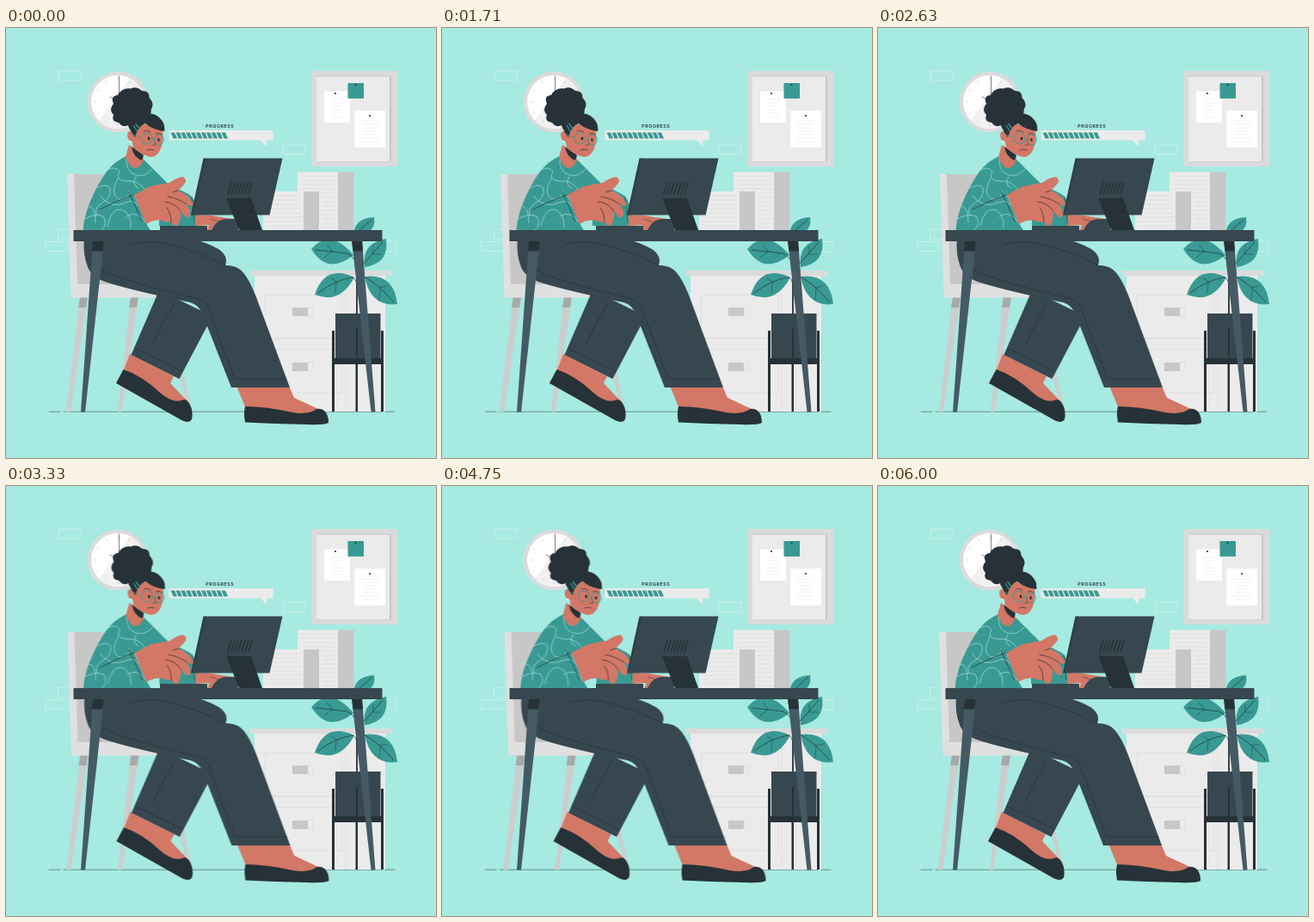
Write an HTML page that moves like this. It is 500 by 500 pixels and loops after 6040 ms.

```html
<!DOCTYPE html>
<html lang="en">
<head>
<meta charset="utf-8">
<title>Work in progress</title>
<style>
html, body { margin: 0; width: 100%; height: 100%; overflow: hidden; background: #a6eae1; }
svg { display: block; width: 100vw; height: 100vh; stroke-width: .7; }
.sway { animation: sway 6040ms linear infinite; }
/* Six seconds of motion, then a 40 ms rest */
@keyframes sway {
  0%, 99.338%, 100% { transform: translateX(0); }
  9.934%, 89.404% { transform: translateX(-1px); }
  19.868%, 79.47% { transform: translateX(2px); }
  29.801%, 49.669%, 69.536% { transform: translateX(-4px); }
  39.735%, 59.603% { transform: translateX(4px); }
}
.teal { fill: #399a93; }
.skin { fill: #d37766; }
.ink { fill: #263238; }
.slate { fill: #37474f; }
.steel { fill: #455a64; }
.pale { fill: #ebebeb; }
.soft { fill: #dbdbdb; }
.grey { fill: #c7c7c7; }
.line { fill: none; stroke: #263238; stroke-linecap: round; stroke-linejoin: round; }
.faint { fill: none; stroke: #dadada; }
.brick { fill: none; stroke: #d9f0ec; }
.swirl { fill: none; stroke: #a9ded8; stroke-linecap: round; }
.frame { fill: none; stroke: #399a93; }
.label { font: 600 5.3px Inter, "Open Sans", sans-serif; fill: #263238; }
</style>
</head>
<body>
<svg viewBox="0 0 500 500">
  <defs>
    <clipPath id="shirt"><path id="shirtShape" d="M140 149Q126 155 117 167Q106 182 97 204Q90 222 89.500 237H169L163 227L149 195L188 181Q174 167 160 153Q149 167 140 149Z"/></clipPath>
    <clipPath id="face"><circle cx="130" cy="86" r="31"/></clipPath>
  </defs>

  <path class="brick" d="M61 50H87V61H61ZM322 135H348V146.500H322ZM60.500 234.500H87V246H60.500ZM45.500 248.500H72V259.500H45.500ZM428 248.500H454V260H428Z"/>
  <path class="line" stroke-width=".5" d="M50 446.200H63M67 446.200H437M441 446.200H452"/>

  <g id="clock">
    <circle class="soft" cx="130" cy="86" r="35.500"/>
    <circle cx="130" cy="86" r="31" fill="#fff"/>
    <path clip-path="url(#face)" d="M150 50L105 112L130 122L170 100V60Z" fill="#f1f1f1"/>
    <path class="line" stroke-width=".6" d="M131.500 56V86L121 80"/>
  </g>

  <g id="board">
    <path class="soft" d="M355.500 50H455V161H355.500Z"/>
    <path class="grey" d="M361 55.500H448V155.500H361Z"/>
    <path class="pale" d="M361 56.500H446V155H361Z"/>
    <path d="M370 73.500H400V110H370ZM405 96H441V139H405Z" fill="#fff"/>
    <path class="teal" d="M397.500 64H416V82H397.500Z"/>
    <g class="ink"><circle cx="383" cy="76" r="1.100"/><circle cx="406.500" cy="66" r="1.100"/><circle cx="423" cy="102" r="1.100"/></g>
  </g>

  <g id="papers">
    <path class="pale" d="M339 167.500H386V235H339Z"/>
    <path class="grey" d="M386 167.500H404.500V235H386Z"/>
    <path class="pale" d="M299 190H346V235H299Z"/>
    <path class="grey" d="M346 190H364V235H346Z"/>
  </g>

  <g id="cabinet">
    <path class="pale" d="M289 287H441V446H289Z"/>
    <path class="soft" d="M283.500 282H449V288H283.500Z"/>
    <path class="faint" d="M301.500 310.500H391V361H301.500ZM301.500 373.500H391V424H301.500ZM395 288V446M301 361H395"/>
    <path class="grey" d="M333 325H351V335H333ZM333 389H351V399H333Z"/>
    <path class="faint" d="M351 325H356.500V335H351ZM351 389H356.500V399H351Z"/>
  </g>

  <g id="plant">
    <path class="line" stroke-width="1.800" d="M408 335V240"/>
    <g class="teal">
      <path d="M404 241Q405 221 428 220Q431 237 412 240Z"/>
      <path d="M417 278Q413 250 442 245Q446 274 417 278Z"/>
      <path d="M404 264Q377 232 355 257Q374 288 404 264Z"/>
      <path d="M405 290Q371 274 359 310Q388 322 405 290Z"/>
      <path d="M417 289Q451 285 455 321Q424 325 417 289Z"/>
    </g>
    <path class="line" d="M408 238Q416 231 425 223M408 290Q410 276 418 272L438 249M408 276Q404 264 396 262L360 258M408 300Q407 289 402 290Q381 294 363 308M408 302Q409 288 418 290Q435 300 451 319"/>
    <path class="line" stroke-width=".5" d="M427 262V254M426 263H436M380 260L373 252M379 260L370 267M386 296L378 291M384 297L383 308M434 302L443 300M435 303L434 316"/>
    <path class="ink" d="M379 352H382V384H436V352H439V446H436V391H409V446H406.500V391H382V446H379Z"/>
    <path class="slate" d="M383 332H435.500V384H383Z"/>
    <path class="line" d="M408 350V391" stroke-width="2"/>
  </g>

  <g id="bubble">
    <path class="pale" d="M189.500 119H310.500V130.500H303.500L303 138L296 130.500H189.500Z"/>
    <g id="bars" class="teal"></g>
    <text class="label" x="248.800" y="115.500" text-anchor="middle" letter-spacing=".55">PROGRESS</text>
  </g>

  <g class="sway">
    <g id="chair">
      <path d="M86 313H95L75 446.500H70ZM145 313H154L134.500 446.500H130ZM196 380L201 380L216.500 446.500H212Z" fill="#cdcdcd"/>
      <path d="M86 313H95L93 325H84ZM145 313H154L152 325H143Z" fill="#a8a8a8"/>
      <path d="M71 170H135V298H150L195 313.500H75.500Z" fill="#e0e0e0"/>
      <path class="grey" d="M79 170H140V298H83Z"/>
    </g>

    <g id="far-leg">
      <path class="skin" d="M144 379L195 405L191 413L210 433L190 438L136 400Z"/>
      <path class="ink" d="M136.500 397L128 413L205 456.500Q213 460 216 455Q218 446 214 438Q211 432 207 432Q195 438 179 424Q158 404 136.500 397Z"/>
      <path class="slate" d="M178 305L145.500 380L201.500 408L240 335Z"/>
      <path class="line" d="M151 373L205 399M196 320Q182 342 171 367"/>
    </g>

    <g id="near-leg">
      <path class="skin" d="M268 416H329L335 430L363 443L350 452L282 450Z"/>
      <path class="ink" d="M278 440Q276 448 278 458.500Q310 460 350 461Q370 462 375 459Q375 450 371 446Q367 442 361 443Q352 450 333 447Q302 440 278 440Z"/>
      <path class="slate" d="M91 244Q89 263 95 278Q100 290 118 296Q150 306 214 319Q225 322 229 334L262 418H330L291 313Q281 287 271 280Q265 276 255 276Q259 265 247 257Q233 249 212 244Z"/>
      <path class="line" d="M96 273Q117 290 220 314Q230 316 235 325L266 408L326 408"/>
      <path class="line" d="M146 252Q158 247 183 250Q222 259 255 276"/>
    </g>

    <g id="far-arm">
      <path class="teal" d="M160 153L188 181L212 193Q221 198 223 216L221 230H178V200Z"/>
      <path class="line" d="M216 196L219 226" stroke-width=".5"/>
      <path class="skin" d="M220 217L239 218Q257 221 265 222Q269 226 265 229L243 235H234L236 229L220 230Z"/>
      <path class="line" d="M238 222Q247 224 253 229" stroke-width=".5"/>
    </g>

    <g id="torso">
      <use href="#shirtShape" class="teal"/>
      <g class="swirl" clip-path="url(#shirt)">
        <path d="M118 165Q128 160 132 167Q126 177 140 178Q154 176 163 190"/>
        <path d="M140 152Q139 167 151 171Q162 174 170 164"/>
        <path d="M102 188Q116 179 121 186Q123 197 111 204Q101 210 106 218"/>
        <path d="M91 222Q104 215 113 219Q119 228 111 235"/>
        <path d="M130 175Q120 193 131 199Q144 200 143 189"/>
        <path d="M118 230Q123 209 134 211Q146 215 145 232"/>
        <path d="M109 195Q122 211 139 203Q149 199 153 206"/>
        <path d="M96 207Q104 207 104 226M140 219Q154 211 162 226M151 173Q145 182 154 186"/>
      </g>
      <path class="line" d="M109 211Q128 201 148 194M142 190Q150 205 158 225"/>
    </g>
  </g>

  <path class="slate" d="M179 230H234V235H179Z"/>

  <g class="sway">
    <g id="near-hand">
      <path class="skin" d="M149 194L168 184Q182 181 190 180Q198 174 206 173Q212 177 206 183L200 189Q211 193 217 203Q219 207 215 207L210 205Q215 213 214 218Q212 222 208 219L203 213Q204 222 200 229Q196 232 192 226L184 225Q175 221 163 228Z"/>
      <path class="line" d="M188 196Q200 198 210 205M185 202Q196 203 203 213M187 209Q192 215 192 226M200 189L194 191"/>
    </g>

    <g id="head">
      <path class="skin" d="M143 136L139 150Q149 174 160 154L159 146Z"/>
      <path class="ink" d="M146 138L160 148L158 154Q148 150 146 138Z"/>
      <path class="skin" d="M149 112H181Q184 124 181 137Q178 149 169 150Q157 148 148 139L147 132Q141 131 141 124Q142 118 148 121Z"/>
      <path class="ink" d="M142 114Q146 102 158 99Q178 97 184 113L184.500 120Q172 119 162 111Q154 113 150 127L147 123Z"/>
      <path class="ink" d="M145 70.500Q152 67 158 73Q167 73 166.500 81Q173 88 169 94Q169 104 160 106Q155 115 146 111Q137 118 131 110Q122 109 125 101Q119 95 125 88Q121 79 130 78Q135 69 145 70.500Z"/>
      <path class="frame" d="M148 113L153 121M150.500 111L155.500 118" stroke-width="1.300"/>
      <path class="line" d="M160 120Q164 118 168 121M174 123Q178 121 181 124M164 142Q168 140 172 142"/>
      <g class="ink"><ellipse cx="166" cy="128.500" rx="1.300" ry="2"/><ellipse cx="177.500" cy="130" rx="1.200" ry="1.900"/></g>
      <path class="line" stroke-width=".5" d="M172 129L174 136L170 136"/>
      <path class="frame" d="M146 123L156 127M170 129H172.500"/>
      <g class="frame" stroke-width=".9"><ellipse cx="163.500" cy="128.500" rx="6.500" ry="6.300"/><ellipse cx="178" cy="130" rx="5.300" ry="6"/></g>
      <circle cx="144.500" cy="132" r="1" fill="#fff"/>
    </g>
  </g>

  <g id="desk">
    <path class="steel" d="M101 247H114L92 446.500H87ZM402 247H414L429.500 446.500H424.500Z"/>
    <path class="ink" d="M101 247H114L112.500 259.500H100ZM402 247H414L415 259.500H403.500Z"/>
    <path class="slate" d="M78.500 235H437.500V248H78.500Z"/>
  </g>

  <g id="monitor">
    <path class="slate" d="M239 235Q245 222 257 222H270V235Z"/>
    <path class="ink" d="M256 198H285L298 235H271Z"/>
    <path d="M229.500 151.500H233L218 217.500H215Z" fill="#2f3d45"/>
    <path class="slate" d="M232 151.500H321.500L306.500 217.500H217Z"/>
    <path class="ink" d="M256 198H285L292 217.500H264Z"/>
    <g id="vents" class="line"></g>
  </g>
</svg>
<script>
const add = (id, attrs) => {
  const el = document.createElementNS('http://www.w3.org/2000/svg', 'path');
  for (const key in attrs) el.setAttribute(key, attrs[key]);
  document.getElementById(id).append(el);
};
const rows = (id, x, y, width, step, count, weight) => {
  for (let i = 0; i < count; i++) {
    const indent = i * 7 % 5;
    add(id, { class: 'faint', 'stroke-width': weight, d: `M${x + indent} ${y + i * step}h${width - indent * 2}` });
  }
};

for (let i = 0; i < 11; i++) add('bars', { d: `M${191.5 + i * 5.9} 121.500h4.500l3 7h-4.500z` });
for (let i = 0; i < 7; i++) add('vents', { d: `M${262 + i * 4} 179.500l-4 13.500`, 'stroke-width': 1.4 });
for (let i = 0; i < 12; i++) {
  const a = i * Math.PI / 6, sin = Math.sin(a), cos = Math.cos(a);
  add('clock', { stroke: '#c7c7c7', d: `M${130 + sin * 25} ${86 - cos * 25}L${130 + sin * 28} ${86 - cos * 28}` });
}
rows('board', 377, 83, 16, 4, 6, .4);
rows('board', 412, 108, 22, 4, 7, .4);
rows('papers', 300, 195, 44, 5, 8, .8);
rows('papers', 340, 172, 45, 5, 4, .8);
rows('papers', 365, 192, 20, 5, 9, .8);
</script>
</body>
</html>
```
